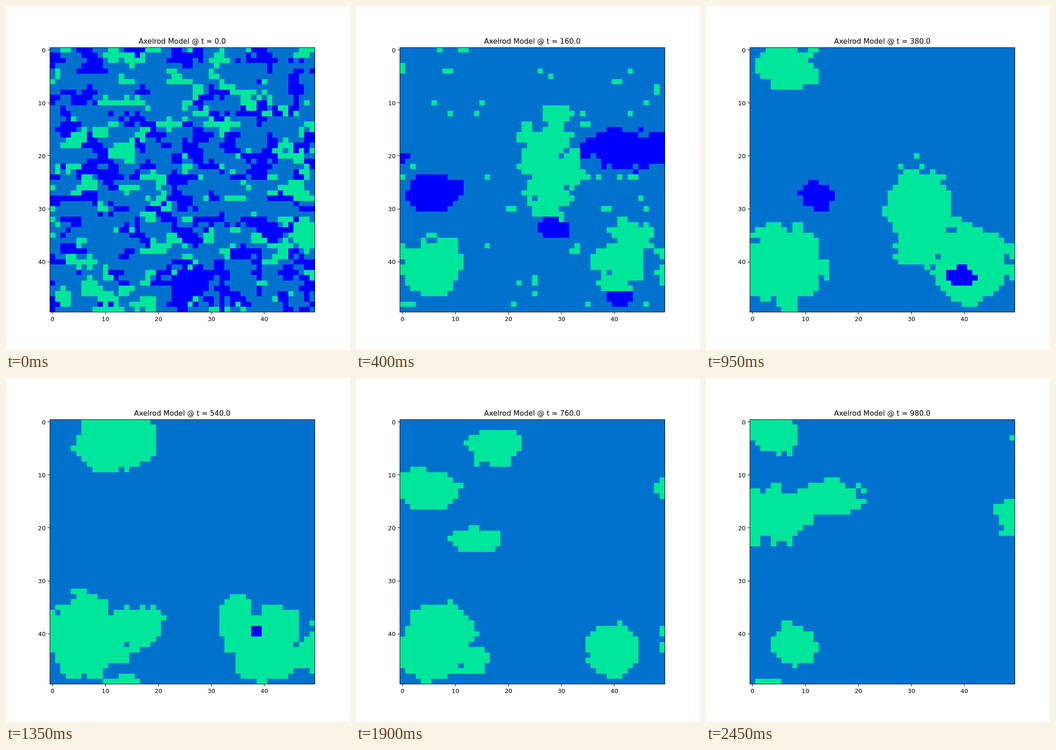
These frames come from a looping animation (748 px wide and 748 px high, 2500 ms). An HTML page with a canvas:

```html
<!DOCTYPE html>
<html lang="en">
<head>
<meta charset="utf-8">
<title>Axelrod Model</title>
<style>
  html, body { margin: 0; width: 100%; height: 100%; overflow: hidden; background: #fefefe; }
  canvas, svg { position: absolute; left: 0; top: 0; display: block; }
  text { font: 12.99px "DejaVu Sans", sans-serif; fill: #000; }
  #title { font-size: 15.58px; text-anchor: middle; }
  .x { text-anchor: middle; }
  .y { text-anchor: end; }
  path, rect { fill: none; stroke: #000; stroke-width: 1.04; }
</style>
</head>
<body>
<canvas id="grid" width="748" height="748"></canvas>
<svg id="axes" width="748" height="748" viewBox="0 0 748 748">
  <rect x="95.5" y="90.5" width="576" height="575"/>
  <text id="title" x="383.35" y="82"></text>
</svg>
<script>
const N = 50, CELL = 11.519, LEFT = 95.37, TOP = 89.76;
const STEP = 50, STEPS = 50;
const MID = '#0072ce', GREEN = '#00e69b', DARK = '#0000ff';
const EMPTY = -0.8;

// A region drifts between two points while it grows and shrinks again
const region = (start, end, from, to, size) => ({ start, end, from, to, size });

const green = [
  region(0, 30, [25, 13.7], [36, 41], [6.6, 10.5]),
  region(0, 54, [4, 40], [8, 42], [8.5, 8]),
  region(-2, 46, [43, 38], [39, 44], [7, 7.5]),
  region(14, 42, [4, 3], [20, 5], [7.5, 6]),
  region(22, 40, [18, 36], [13, 46], [5.5, 4.5]),
  region(34, 58, [5, 11], [3, 22], [8.5, 5.5]),
  region(34, 58, [14, 25], [14, 8], [7, 3.5]),
  region(42, 58, [4, 2], [4, 3], [5, 4])
];
const dark = [
  region(0, 22, [1.5, 26.5], [14, 27.5], [5, 4.3]),
  region(0, 16, [42, 18], [43, 20], [8, 3.8]),
  region(2, 14, [27, 34], [29, 33], [3.5, 2.2]),
  region(2, 29, [42, 49], [38, 39], [3, 2])
];

const lerp = (a, b, u) => a + (b - a) * u;
const wrap = d => (d + 1.5 * N) % N - N / 2;

// Repeatable random value in -1..1
function hash(x, y, z, seed) {
  let h = Math.imul(x, 374761393) ^ Math.imul(y, 668265263)
        ^ Math.imul(z, 1274126177) ^ Math.imul(seed, 974634777);
  h = Math.imul(h ^ (h >>> 15), 2246822519);
  h = Math.imul(h ^ (h >>> 13), 3266489917);
  return ((h ^ (h >>> 16)) >>> 0) / 2147483648 - 1;
}

function patch(x, y, z, seed) {
  const i = Math.floor(x), j = Math.floor(y), u = x - i, v = y - j;
  return lerp(lerp(hash(i, j, z, seed), hash(i + 1, j, z, seed), u),
              lerp(hash(i, j + 1, z, seed), hash(i + 1, j + 1, z, seed), u), v);
}

function noise(x, y, step, seed) {
  const z = Math.floor(step / 4), u = step / 4 - z;
  const at = k => 0.75 * patch(x / 2.3, y / 2, k, seed) + 0.25 * hash(x, y, k, seed + 9);
  return lerp(at(z), at(z + 1), u);
}

// Ellipses alive at a step
function shapes(regions, step) {
  return regions.filter(r => step > r.start && step < r.end).map(r => {
    const u = (step - r.start) / (r.end - r.start);
    const scale = Math.sqrt(Math.sin(Math.PI * u));
    return {
      x: lerp(r.from[0], r.to[0], u), y: lerp(r.from[1], r.to[1], u),
      rx: r.size[0] * scale, ry: r.size[1] * scale
    };
  });
}

function field(ellipses, x, y) {
  let best = EMPTY;
  for (const e of ellipses) {
    best = Math.max(best, 1 - (wrap(x - e.x) / e.rx) ** 2 - (wrap(y - e.y) / e.ry) ** 2);
  }
  return best;
}

const ctx = document.getElementById('grid').getContext('2d');
const axes = document.getElementById('axes');
const title = document.getElementById('title');
const edgeX = i => Math.round(LEFT + i * CELL);
const edgeY = j => Math.round(TOP + j * CELL);

function add(tag, attrs, text = '') {
  const el = document.createElementNS('http://www.w3.org/2000/svg', tag);
  for (const name in attrs) el.setAttribute(name, attrs[name]);
  el.textContent = text;
  axes.append(el);
}

for (let n = 0; n < N; n += 10) {
  const x = LEFT + (n + 0.5) * CELL, y = TOP + (n + 0.5) * CELL;
  const px = Math.floor(x) + 0.5, py = Math.floor(y) + 0.5;
  add('path', { d: `M${px} 666v4.5M95 ${py}h-4.5` });
  add('text', { class: 'x', x, y: 685.3 }, n);
  add('text', { class: 'y', x: 86.3, y: y + 5 }, n);
}

function draw(step) {
  const decay = Math.exp(-step / 4);
  const greens = shapes(green, step), darks = shapes(dark, step);
  const inside = (ellipses, x, y, amp, seed) =>
    field(ellipses, x, y) + amp * noise(x, y, step, seed) > 0;

  ctx.fillStyle = MID;
  ctx.fillRect(96, 90, 576, 576);
  for (let y = 0; y < N; y++) {
    for (let x = 0; x < N; x++) {
      const isDark = inside(darks, x, y, 0.4 + 2.8 * decay, 2);
      if (!isDark && !inside(greens, x, y, 0.8 + 2.9 * decay, 1)) continue;
      const px = edgeX(x), py = edgeY(y);
      ctx.fillStyle = isDark ? DARK : GREEN;
      ctx.fillRect(px, py, edgeX(x + 1) - px, edgeY(y + 1) - py);
    }
  }
  title.textContent = `Axelrod Model @ t = ${(step * 20).toFixed(1)}`;
}

let shown = -1;
const start = performance.now();
function tick() {
  const step = Math.floor(Math.max(0, performance.now() - start) / STEP) % STEPS;
  if (step !== shown) draw(shown = step);
  requestAnimationFrame(tick);
}
tick();
</script>
</body>
</html>
```
